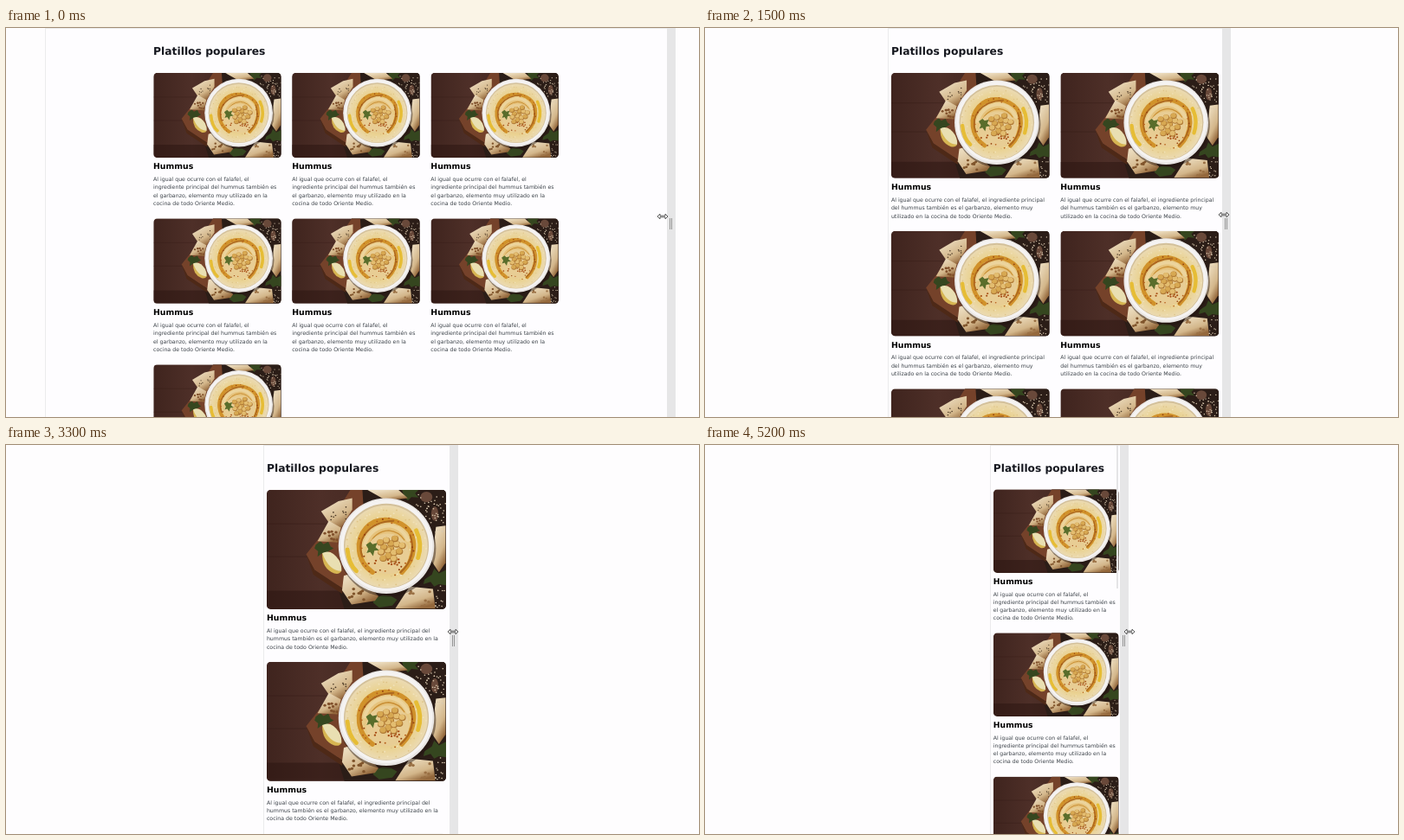
An HTML page for the animation above (5300 ms loop, 800 by 450 pixels).

```html
<!DOCTYPE html>
<html lang="es">
<head>
<meta charset="utf-8">
<title>Platillos populares</title>
<style>
html, body { margin: 0; width: 100%; height: 100%; overflow: hidden; background: #fefdfe; }
#stage { position: relative; width: 800px; height: 450px; overflow: hidden; }
#page, #handle, #cursor, #scroll, #defs { position: absolute; top: 0; }
#page { height: 450px; overflow: hidden; background: #fefdff; box-shadow: inset 1px 1px #ebebec; }
#sheet {
  box-sizing: border-box; padding: 45px 10px; transform-origin: 0 0;
  font: 16px/24px "DejaVu Sans", Verdana, sans-serif; color: #3b4248;
  text-rendering: geometricPrecision;
}
#sheet > * { max-width: 1200px; margin: 0 auto; }
h1 { font-size: 31.6px; line-height: 48px; color: #15171f; }
#grid { margin-top: 40px; display: grid; gap: 32px; grid-template-columns: repeat(auto-fill, minmax(375px, 1fr)); }
.pic { display: block; width: 100%; aspect-ratio: 3 / 2; border-radius: 12px; }
h2 { margin: 8px 0; font-size: 24px; line-height: 36px; color: #000; }
p { margin: 0; }
#handle { width: 10px; height: 450px; background: #e6e6e7; }
#handle::after {
  content: ""; position: absolute; left: 3px; top: 220px; width: 1px; height: 13px;
  border: solid #959595; border-width: 0 1px;
}
#scroll { width: 2px; height: 166px; background: #e4e4e6; }
#cursor { width: 14px; height: 8px; overflow: visible; }
</style>
</head>
<body>
<div id="stage">
  <div id="page"><div id="sheet"><h1>Platillos populares</h1><div id="grid"></div></div></div>
  <div id="scroll"></div>
  <div id="handle"></div>
  <svg id="cursor" viewBox="-7 -4 14 8">
    <path d="M-6 0L-3-2.8V-.8H3V-2.8L6 0 3 2.8V.8H-3V2.8Z" fill="#fff" stroke="#333" stroke-width=".8"/>
  </svg>
</div>

<svg id="defs" width="0" height="0">
  <linearGradient id="wood">
    <stop offset="0" stop-color="#3f241e"/><stop offset=".3" stop-color="#4e2f28"/><stop offset="1" stop-color="#382019"/>
  </linearGradient>
  <linearGradient id="bread" x2=".6" y2="1">
    <stop offset=".2" stop-color="#ebdbbd"/><stop offset=".7" stop-color="#d3b68a"/><stop offset="1" stop-color="#94683c"/>
  </linearGradient>
  <radialGradient id="cream">
    <stop offset=".4" stop-color="#e5c17a"/><stop offset=".75" stop-color="#ead394"/><stop offset="1" stop-color="#ebdab2"/>
  </radialGradient>
  <symbol id="dish" viewBox="0 0 300 200">
    <path fill="url(#wood)" d="M0 0H300V200H0Z"/>
    <path fill="#2a1511" opacity=".5" d="M0 169H300V200H0Z"/>
    <path stroke="#341b16" opacity=".6" d="M0 57H100M0 112H70"/>
    <path fill="#2b1d17" d="M140 0H300V200H130L118 160Z"/>
    <path fill="#75422a" d="M66 108L96 70 140 0H160L170 160 128 166 80 134Z"/>
    <path fill="#4e2917" d="M66 108L80 134 128 166 126 174 78 142Z"/>
    <g fill="#35461f">
      <path d="M82 92l8-6 5 5 8-4 4 8 5 3-9 5-4 8-6-5-8 6 1-9-6-5z"/>
      <path d="M264 150l12-8 4-10 8 8 12-6v26l-12-2-8 4-6-8-12 4z"/>
      <path d="M226 0h28l-6 6 6 7-12-1-6 6-6-7zM180 182l14-6 14 2 10 6-8 10-22 3-10-8z"/>
    </g>
    <g fill="url(#bread)">
      <path d="M91 36L120 19 143 14 143 33 124 64 104 55Z"/>
      <path d="M104 52L124 63 119 88 85 86Z"/>
      <path d="M129 144L148 138 187 178 181 186 142 192 126 168Z"/>
      <path d="M239 162L278 166 282 199H215Z"/>
      <path d="M283 62L299 60V122L288 138 276 120Z"/>
      <path d="M168 0H220L236 14 200 18Z"/>
    </g>
    <g fill="#69493a"><ellipse cx="267" cy="12" rx="10" ry="9"/><ellipse cx="281" cy="40" rx="6" ry="12"/></g>
    <g id="seeds"></g>
    <path fill="#d6b552" d="M93 106Q92 132 113 140 122 142 125 136Z"/>
    <path fill="#e9dfb2" d="M93 106Q108 98 121 118 126 128 125 136 104 136 93 106Z"/>
    <circle cx="202" cy="98" r="81" fill="#20120e" opacity=".45"/>
    <circle cx="200" cy="94" r="80" fill="#e9e6e4"/>
    <circle cx="200" cy="93" r="77" fill="#f5f3f2"/>
    <circle cx="200" cy="94" r="71" fill="#d3c09a"/>
    <circle cx="200" cy="95" r="69" fill="url(#cream)"/>
    <g id="grain"></g>
    <g fill="none" stroke-linecap="round">
      <path stroke="#e6bd35" stroke-width="7" d="M135 100Q137 124 150 136M250 68Q261 90 253 114"/>
      <path stroke="#d1922b" stroke-width="8" d="M177 138C150 120 148 84 166 64S214 48 232 62 252 112 226 138"/>
      <path stroke="#ad681e" stroke-width="3" d="M160 112C150 84 168 54 212 52M240 76Q252 112 224 138"/>
      <path stroke="#ecd49d" stroke-width="6" d="M164 92Q172 62 204 60 226 62 236 84"/>
      <path stroke="#c98f35" stroke-width="2" d="M172 92Q180 70 204 68 222 70 230 84"/>
    </g>
    <ellipse cx="202" cy="107" rx="36" ry="34" fill="#e8cd94"/>
    <g id="spice"></g>
    <g id="peas"></g>
    <path fill="#596d2b" d="M166 92l7-5 4 4 8-2-3 7 6 5-8 1-2 9-5-7-6 2 3-7z"/>
  </symbol>
</svg>

<script>
const $ = id => document.getElementById(id);
const SCALE = 0.39, LOOP = 5300, STEP = 100;

let seed = 7;
const rand = (lo, hi) => lo + (hi - lo) * ((seed = seed * 16807 % 2147483647) / 2147483647);
const dot = (x, y, r, fill) =>
  `<ellipse cx="${x.toFixed(1)}" cy="${y.toFixed(1)}" rx="${r}" ry="${r * 0.9}" fill="${fill}"/>`;
const scatter = (n, make) => Array.from({ length: n }, (_, i) => make(i)).join("");
const polar = (x, y, a, r, size, fill) => dot(x + r * Math.cos(a), y + r * Math.sin(a), size, fill);

$("seeds").innerHTML =
  scatter(55, () => dot(rand(250, 299), rand(8, 76), 1.2, "#d9c8ae")) +
  scatter(14, () => dot(rand(282, 299), rand(160, 198), 1.2, "#d9c8ae")) +
  scatter(12, () => dot(rand(104, 136), rand(28, 52), 1.3, "#493724")) +
  scatter(10, () => dot(rand(92, 118), rand(68, 84), 2.4, "#80502b")) +
  scatter(10, () => dot(rand(136, 168), rand(160, 186), 2.6, "#80552c")) +
  scatter(9, () => dot(rand(238, 274), rand(170, 196), 2.5, "#9a7044"));
$("grain").innerHTML = scatter(90, i =>
  polar(200, 95, i * 2.4, rand(38, 67), 1.4, i % 2 ? "#f1e2bb" : "#dfc487"));
$("spice").innerHTML =
  scatter(30, i => polar(200, 96, i * 2.4, rand(40, 50), 1.5, i % 3 ? "#b7621c" : "#94400f")) +
  scatter(14, () => dot(rand(168, 226), rand(116, 128), 1.8, "#a64c13"));
$("peas").innerHTML = scatter(15, i => {
  const a = i * 2.4, r = 5.6 * Math.sqrt(i);
  return polar(207, 98, a, r, 6, "#b07a35") + polar(206.5, 97, a, r, 5, i % 2 ? "#e3bd70" : "#d7a852");
});

$("grid").innerHTML = `<article>
  <svg class="pic" viewBox="0 0 300 200"><use href="#dish"/></svg>
  <h2>Hummus</h2>
  <p>Al igual que ocurre con el falafel, el ingrediente principal del hummus también es
  el garbanzo, elemento muy utilizado en la cocina de todo Oriente Medio.</p>
</article>`.repeat(7);

// time, right edge of the page, layout lag, cursor offset from that edge
const KEYS = [
  [0, 763, 0, -5], [600, 697, 0, -3], [1100, 632, 5, -1], [1200, 619, 3, 0], [1500, 597, 0, 2],
  [1800, 585, 0, 2], [2200, 557, 0, 3], [2400, 552, 0, 3], [2700, 533, 0, 4], [3000, 518, 0, 4],
  [3600, 505, 0, 4], [4100, 493, 0, 4], [4800, 479, 0, 5], [5200, 479, 0, 11]
];

function pose(t) {
  const i = Math.max(1, KEYS.findIndex(k => k[0] >= t));
  const a = KEYS[i - 1], b = KEYS[i], u = (t - a[0]) / (b[0] - a[0]);
  return a.map((v, j) => v + (b[j] - v) * u);
}

function draw() {
  const t = Math.floor(performance.now() % LOOP / STEP) * STEP;
  const [, right, lag, offset] = pose(t);
  const left = 808 - right - lag / 5, width = right - left;
  // the page no longer fits its narrowest column and zooms out
  const tight = t > 4800, zoom = tight ? 0.99 : 1;

  $("page").style.left = left + "px";
  $("page").style.width = width + "px";
  $("sheet").style.width = (width + lag) / SCALE + "px";
  $("sheet").style.transform = `scale(${SCALE * zoom})`;
  $("handle").style.left = right + "px";
  $("scroll").style.left = right - 4 + "px";
  $("scroll").style.display = tight ? "block" : "none";
  $("cursor").style.left = right + offset - 7 + "px";
  $("cursor").style.top = (t < 600 ? 214 : 211.5) + "px";
  requestAnimationFrame(draw);
}
draw();
</script>
</body>
</html>
```
